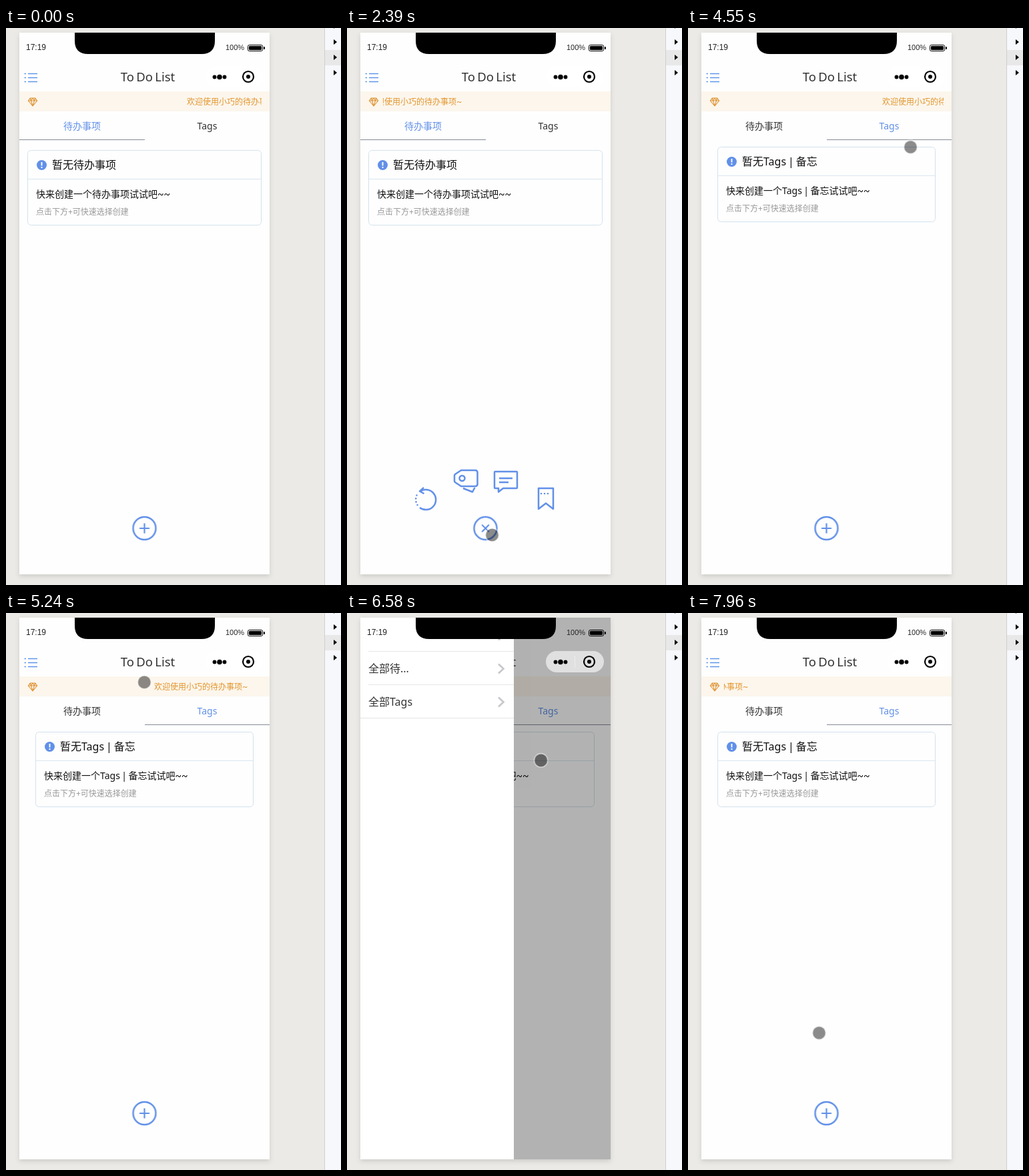
Animation, 502 px wide and 835 px high, one loop 8000 ms. Source, as an HTML page:

```html
<!DOCTYPE html>
<html lang="zh-CN">
<head>
<meta charset="utf-8">
<title>To Do List</title>
<style>
html, body { margin: 0; width: 100%; height: 100%; overflow: hidden; background: #ebeae6; }
svg { display: block; width: 502px; height: 835px; }
text { font-family: "Noto Sans", "Noto Sans CJK SC", "Noto Sans CJK", sans-serif; fill: #333; white-space: pre; word-spacing: -.08em; }
.status { font-family: "Liberation Sans", Arial, sans-serif; fill: #222; }
.wave { font-family: Roboto, sans-serif; }
.mid { text-anchor: middle; }
.line { fill: none; stroke: #6190e8; stroke-width: 2.5; stroke-linejoin: round; }
.dots { stroke-dasharray: 0 5; stroke-linecap: round; stroke-width: 2.6; }
.card rect { fill: #fefefe; stroke: #d3e2ec; }
.card .head { stroke: #dbe6ee; }
.card .title { font-size: 16px; fill: #111; }
.card .body { font-size: 14px; fill: #111; }
.card .note { font-size: 12px; fill: #999; }
.tab { font-size: 14px; }
.underline { fill: #868b94; transform-box: fill-box; transform-origin: center; }
.chevron { fill: none; stroke: #c7c7cc; stroke-width: 2.6; }

.marquee, .panes, .plus, .tool, .drawer, .mask, .cursor, .click,
.tab, .underline { animation: 8s linear infinite; }

.marquee { animation-name: marquee; }
@keyframes marquee {
  0% { transform: translateX(271px); }
  44.625%, 45.37% { transform: translateX(-86px); }
  45.375% { transform: translateX(383px); }
  100% { transform: translateX(-54px); }
}

.plus { animation-name: plus; }
@keyframes plus {
  0%, 17.75% { transform: translate(207.5px, 750px); animation-timing-function: ease; }
  22.75%, 32% { transform: translate(207.5px, 750px) rotate(45deg); animation-timing-function: ease; }
  37%, 100% { transform: translate(207.5px, 750px); }
}

.tool { animation-name: tool; }
@keyframes tool {
  0%, 17.75% { transform: translate(207.5px, 750px) rotate(-360deg); opacity: 0; animation-timing-function: ease-out; }
  22.75%, 32% { transform: translate(var(--x), var(--y)) rotate(0deg); opacity: 1; animation-timing-function: ease-out; }
  37%, 100% { transform: translate(207.5px, 750px) rotate(-360deg); opacity: 0; }
}

.panes { animation-name: panes; }
@keyframes panes {
  0%, 51.88% { transform: none; animation-timing-function: cubic-bezier(.645, .045, .355, 1); }
  55.63%, 100% { transform: translateX(-375px); }
}
.tab.first { animation-name: tabOff; }
.tab.second { animation-name: tabOn; }
@keyframes tabOff { 0%, 51.88% { fill: #6190e8; } 55.63%, 100% { fill: #333; } }
@keyframes tabOn { 0%, 51.88% { fill: #333; } 55.63%, 100% { fill: #6190e8; } }
.underline.first { animation-name: lineOff; }
.underline.second { animation-name: lineOn; }
@keyframes lineOff { 0%, 51.88% { transform: none; } 55.63%, 100% { transform: scaleX(0); } }
@keyframes lineOn { 0%, 51.88% { transform: scaleX(0); } 55.63%, 100% { transform: none; } }

.drawer { animation-name: drawer; }
@keyframes drawer {
  0%, 73.91% { transform: translateX(-230px); opacity: 0; animation-timing-function: cubic-bezier(0, 0, .2, 1); }
  76.73%, 91.63% { transform: none; opacity: 1; animation-timing-function: cubic-bezier(0, 0, .2, 1); }
  94.44%, 100% { transform: translateX(-230px); opacity: 0; }
}
.mask { animation-name: mask; }
@keyframes mask {
  0%, 73.63% { opacity: 0; animation-timing-function: ease-in; }
  75.5%, 91.63% { opacity: .3; animation-timing-function: ease-in; }
  93.5%, 100% { opacity: 0; }
}

.cursor { animation-name: cursor, appear; }
@keyframes cursor {
  0%, 6.5% { transform: translate(352px, 808px); }
  7.5% { transform: translate(305px, 780px); }
  8.5% { transform: translate(280px, 765px); }
  9.38% { transform: translate(250px, 757px); }
  10.38% { transform: translate(198px, 750px); }
  15%, 21.25% { transform: translate(212px, 748px); }
  29.88%, 35.75% { transform: translate(217.5px, 760px); }
  37% { transform: translate(205px, 705px); }
  39.56% { transform: translate(228px, 483px); }
  40.5% { transform: translate(253px, 417px); }
  41.38% { transform: translate(265px, 350px); }
  42.38% { transform: translate(288px, 255px); }
  43.25% { transform: translate(310px, 195px); }
  46.25%, 52.5% { transform: translate(320px, 155px); }
  56.25%, 61.25% { transform: translate(333.5px, 178.5px); }
  63.63% { transform: translate(290px, 112px); }
  67.5% { transform: translate(120px, 95px); }
  70%, 76.88% { transform: translate(46.5px, 85.5px); }
  82.25% { transform: translate(290.5px, 220.5px); }
  85% { transform: translate(307px, 312px); }
  88.88%, 91.88% { transform: translate(274px, 401px); }
  99.5%, 100% { transform: translate(196.5px, 629.5px); }
}
@keyframes appear { 0%, 6.49% { opacity: 0; } 6.5%, 100% { opacity: 1; } }

.click { animation-name: click; animation-timing-function: step-end; }
@keyframes click {
  0% { opacity: 0; }
  16.5% { opacity: .7; } 18% { opacity: 0; }
  31% { opacity: .7; } 32.5% { opacity: 0; }
  50.75% { opacity: .7; } 52.25% { opacity: 0; }
  72% { opacity: .7; } 73.4% { opacity: 0; }
  90.85% { opacity: .7; } 92% { opacity: 0; }
  100% { opacity: 0; }
}
</style>
</head>
<body>
<svg viewBox="0 0 502 835">
  <defs>
    <clipPath id="screen"><path d="M20 7h375v812H20z"/></clipPath>
    <clipPath id="notice"><path d="M54 95h329v30H54z"/></clipPath>
    <filter id="shadow" x="-10%" y="-5%" width="120%" height="110%">
      <feDropShadow dx="0" dy="3" stdDeviation="3.5" flood-opacity=".13"/>
    </filter>
    <g id="info">
      <circle r="7.5" fill="#6190e8"/>
      <path d="M0-4.5V1M0 2.6v1.8" stroke="#fff" stroke-width="1.9"/>
    </g>
    <path id="arrow" d="M0-4L5 0 0 4z"/>
    <path id="chevron" class="chevron" d="M227-7l7.5 7-7.5 7"/>
  </defs>

  <path fill="#ebeae6" d="M0 0h502v835H0z"/>
  <path fill="#f7f8fb" d="M477 0h25v835h-25z"/>
  <path fill="#e8e8e9" d="M478 33h24v23h-24z"/>
  <path stroke="#cfcfcf" d="M477.5 0v835"/>
  <use href="#arrow" x="491" y="-3"/>
  <use href="#arrow" x="491" y="21"/>
  <use href="#arrow" x="491" y="44"/>
  <use href="#arrow" x="491" y="67"/>

  <path fill="#fefefe" filter="url(#shadow)" d="M20 7h375v812H20z"/>

  <g clip-path="url(#screen)">
    <path d="M33 68.5h14M33 74.5h14M33 80.5h14M27.5 68.5h2.5M27.5 74.5h2.5M27.5 80.5h2.5" stroke="#5f97ea" stroke-width="1.6"/>
    <text class="mid" x="212.5" y="80" font-size="18.5">To Do List</text>

    <path fill="#fcf6ed" d="M20 95h375v30H20z"/>
    <path d="M36.3 105h7.4l3 4-6.7 8-6.7-8zM33.3 109h13.4M36.3 105l1.2 4 2.5 8 2.5-8 1.2-4M37.5 109l2.5-4 2.5 4" fill="none" stroke="#de9433" stroke-width="1.1" stroke-linejoin="round"/>
    <g clip-path="url(#notice)">
      <text class="marquee" y="115" font-size="12" style="fill:#e2952c">欢迎使用小巧的待办事项<tspan class="wave">~</tspan></text>
    </g>

    <text class="tab first mid" x="114" y="152">待办事项</text>
    <text class="tab second mid" x="301.5" y="152">Tags</text>
    <rect class="underline first" x="20" y="167" width="188" height="1"/>
    <rect class="underline second" x="208" y="167" width="187" height="1"/>

    <g class="panes">
      <g class="card">
        <rect x="32.5" y="183.5" width="350" height="112" rx="5"/>
        <path class="head" d="M33 226.5h349"/>
        <use href="#info" x="53.5" y="205.5"/>
        <text class="title" x="69" y="211">暂无待办事项</text>
        <text class="body" x="45" y="254">快来创建一个待办事项试试吧<tspan class="wave">~~</tspan></text>
        <text class="note" x="45" y="280">点击下方+可快速选择创建</text>
      </g>
      <g class="card" transform="translate(387 -5)">
        <rect x="32.5" y="183.5" width="326" height="112" rx="5"/>
        <path class="head" d="M33 226.5h325"/>
        <use href="#info" x="53.5" y="205.5"/>
        <text class="title" x="69" y="211">暂无Tags | 备忘</text>
        <text class="body" x="45" y="254">快来创建一个Tags | 备忘试试吧<tspan class="wave">~~</tspan></text>
        <text class="note" x="45" y="280">点击下方+可快速选择创建</text>
      </g>
    </g>

    <g class="tool line" style="--x:118px;--y:707px">
      <path d="M-8-12.5A15 15 0 1 1-9 12"/>
      <path d="M-3-18l-6 5.5 6.5 3.5"/>
      <path class="dots" d="M-12.5 8A15 15 0 0 1-12-9"/>
    </g>
    <g class="tool line" style="--x:178px;--y:679px">
      <path d="M-7-16H14q3.5 0 3.5 3.5V4.500q0 3.500-3.500 3.500H-7L-16 2q-1-1-1-2v-8q0-1 1-2z"/>
      <circle cx="-5.500" cy="-4" r="4"/>
      <path d="M-4 11L10 16.500 13.500 10"/>
    </g>
    <g class="tool line" style="--x:238px;--y:680px">
      <path d="M-16-15H16q1 0 1 1V9q0 1-1 1H-4l-7 5.500V10h-5q-1 0-1-1v-23q0-1 1-1zM-10-5H10M-10 1H4"/>
    </g>
    <g class="tool line" style="--x:298px;--y:706px">
      <path d="M-11-16H11V15L0 6.500-11 15z"/>
      <path class="dots" d="M-7-8H8"/>
    </g>
    <g class="plus line">
      <circle r="17" fill="#fefefe"/>
      <path d="M-7.500 0h15M0-7.500v15" stroke-width="2.200"/>
    </g>

    <path class="mask" d="M20 7h375v812H20z"/>
    <g class="drawer">
      <path fill="#fff" d="M20 7h230v812H20z"/>
      <path stroke="#e6e6e6" d="M32 57.500h218M32 107.500h218M20 157.500h230"/>
      <use href="#chevron" y="33.500"/>
      <use href="#chevron" y="83.500"/>
      <use href="#chevron" y="133.500"/>
      <text x="32" y="89" font-size="16">全部待...</text>
      <text x="32" y="139" font-size="16">全部Tags</text>
    </g>

    <rect x="298" y="57" width="87" height="32" rx="16" fill="#fff" opacity=".6"/>
    <path stroke="#fff" stroke-opacity=".4" d="M341.500 64v18"/>
    <circle cx="312.500" cy="73.500" r="2.900"/>
    <circle cx="320" cy="73.500" r="3.800"/>
    <circle cx="327.500" cy="73.500" r="2.900"/>
    <circle cx="363" cy="73" r="8" fill="none" stroke="#000" stroke-width="2.200"/>
    <circle cx="363" cy="73" r="3"/>

    <path d="M103 7h210v12q0 20-20 20H123q-20 0-20-20z"/>
    <text class="status" x="30" y="33" font-size="12">17:19</text>
    <text class="status" x="329" y="33" font-size="11">100%</text>
    <rect x="362.500" y="25.500" width="22" height="9" rx="2" fill="none" stroke="#000"/>
    <rect x="364" y="27" width="19" height="6" rx="1"/>
    <path d="M386 28h1q1 0 1 2t-1 2h-1z"/>

    <g class="cursor">
      <circle r="10.200" fill="none" stroke="#fff" stroke-opacity=".5" stroke-width="1.500"/>
      <circle r="9.500" fill-opacity=".45"/>
      <circle class="click" r="11" fill="#f8f42e"/>
    </g>
  </g>
</svg>
</body>
</html>
```
